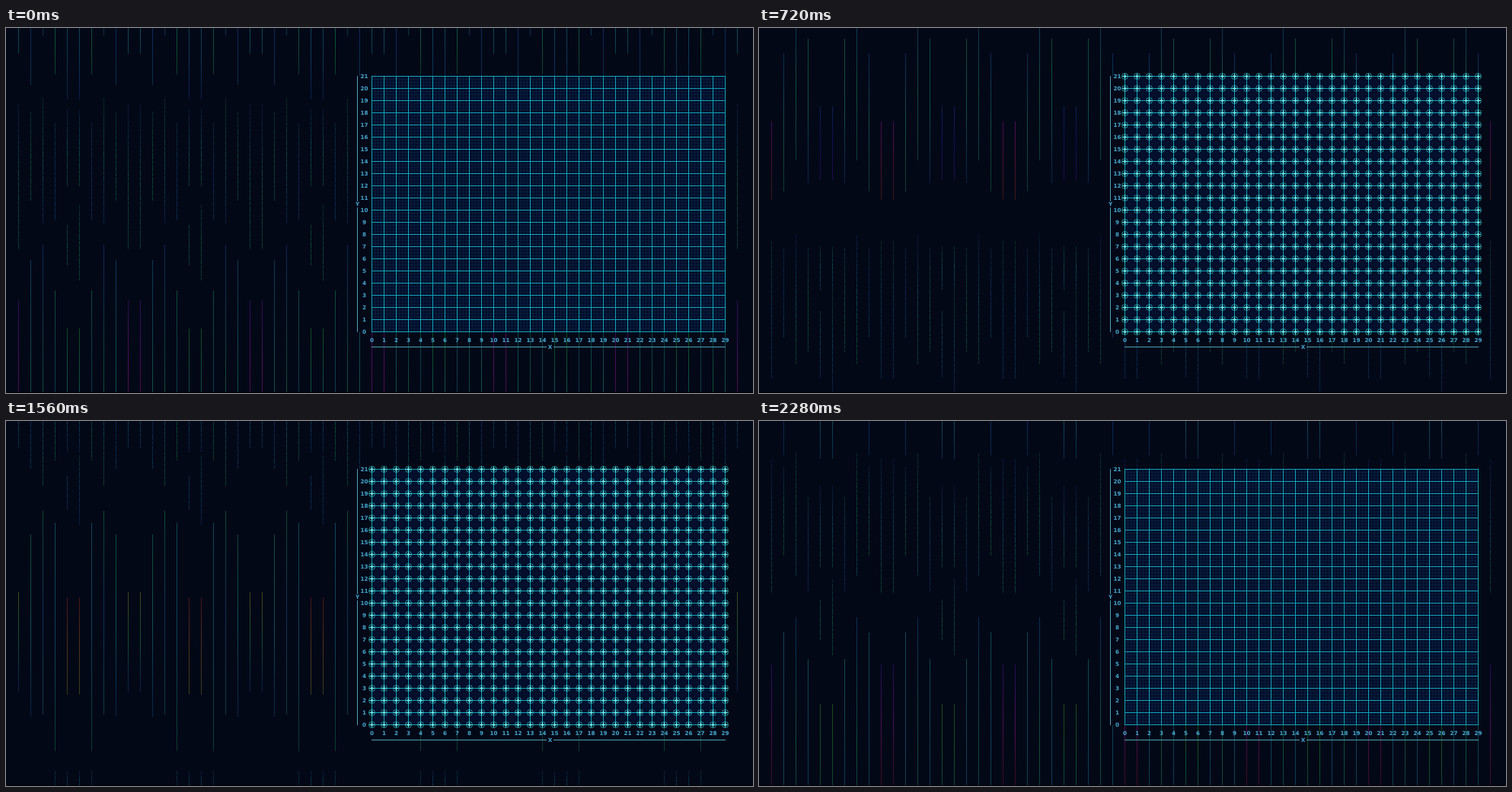
These frames come from a looping animation (981 px wide and 480 px high, 2400 ms). An HTML page:

```html
<!DOCTYPE html>
<html lang="en">
<head>
<meta charset="utf-8">
<title>Coordinate grid</title>
<style>
  html, body { margin: 0; width: 100%; height: 100%; overflow: hidden; background: #030817; }
  svg { display: block; width: 981px; height: 480px; }
  text { font: bold 7.2px "DejaVu Sans", sans-serif; fill: #46a8d0; text-anchor: middle; }
</style>
</head>
<body>
<svg id="stage" viewBox="0 0 981 480">
  <defs>
    <clipPath id="outside">
      <path clip-rule="evenodd" d="M0 0H981V479H0ZM460 63H948V400H460Z"/>
    </clipPath>
    <pattern id="fine" x="480" y="63" width="4" height="4" patternUnits="userSpaceOnUse">
      <path d="M0 .5H4M.5 0V4" stroke="#071d3c" fill="none"/>
    </pattern>
  </defs>
  <rect width="981" height="480" fill="#030817"/>
  <rect y="479" width="981" height="1" fill="#000"/>
  <g id="rain" clip-path="url(#outside)" fill="none"></g>
  <rect x="480" y="63" width="465" height="337" fill="#020d29"/>
  <rect id="mesh" x="480" y="63" width="465" height="337" fill="url(#fine)"/>
  <g id="chart" fill="none"></g>
</svg>
<script>
const LOOP = 2400, STEP = 120;
const COLS = 29, ROWS = 21, CELL = 16, LEFT = 480.5, TOP = 63.5, BOTTOM = TOP + ROWS * CELL;
const RIGHT = LEFT + COLS * CELL;
const KEYS = [0, 240, 720, 1200, 1560, 2040, 2280];

const $ = id => document.getElementById(id);
function add(parent, name, attrs, text) {
  const el = document.createElementNS("http://www.w3.org/2000/svg", name);
  for (const key in attrs) el.setAttribute(key, attrs[key]);
  if (text !== undefined) el.textContent = text;
  return parent.appendChild(el);
}

const keyTime = n => KEYS[n % 7] + LOOP * Math.floor(n / 7);
function lerpList(list, u) {
  const i = Math.min(Math.floor(u), list.length - 2);
  return list[i] + (list[i + 1] - list[i]) * (u - i);
}
const spread = (list, p) => lerpList(list, p * (list.length - 1));

// Falling streaks: columns repeat every ten; "top" is the upper end at successive key times.
const drift = [-64, 0, 50, 100, 155, 280, 405, 490];
const streaks = [
  { cols: [0, 1], born: 0, top: [-40, 28, 123, 175, 225, 293, 320, 358, 437], len: [74, 190],
    hue: [180, 190, 300, 320, 430, 600, 620, 630, 640], span: [0, 150, 30] },
  { cols: [2, 9], born: 6, top: [-50, -49, -23, 33, 104, 149, 218, 278, 305, 387], len: [95, 356] },
  { cols: [3, 8], born: 0, top: [-90, -54, -10, 58, 118, 213, 258, 285, 402], len: [100, 436] },
  { cols: [4, 7], born: 0, top: [-19, -24, 14, 80, 134, 213, 313, 345, 432], len: [80, 520] },
  { cols: [5, 6], born: 6, top: [-50, -5, 38, 103, 174, 232, 317, 372, 395, 480], len: [100, 97, 143, 150],
    hue: [170, 220, 440, 510], span: [30, 70] },
  { cols: [0, 1], born: 4, top: drift, len: [100, 190, 192, 115], dotted: true },
  { cols: [2, 9], born: 4, top: drift.map(y => y + 10), len: [117, 117], dotted: true },
  { cols: [3, 8], born: 4, top: drift.map(y => y - 8), len: [157, 175], dotted: true },
  { cols: [4, 7], born: 4, top: [-63, 43, 100, 125, 163, 289, 376, 460, 530], len: [115, 150], dotted: true },
  { cols: [5, 6], born: 3, top: [0, 45, 150, 208, 232, 254, 345, 432, 500], len: [83, 100, 100, 135, 140],
    trim: 5, dotted: true },
  { cols: [5, 6], born: 4, top: [-64, 27, 85, 107, 165, 287, 387, 460, 540], len: [105, 108, 50, 28], dotted: true }
];

// A streak can live into the third loop, so each is drawn once per loop of age.
const rays = [];
streaks.forEach((streak, n) => [0, LOOP, 2 * LOOP].forEach(lag => {
  const id = "ray" + rays.length;
  const gradient = add($("stage").querySelector("defs"), "linearGradient",
    { id, gradientUnits: "userSpaceOnUse", x1: 0, x2: 0 });
  const alphas = streak.dotted ? [.22, .42, .36] : [.46, .5, .36];
  const stops = alphas.map((alpha, i) =>
    add(gradient, "stop", { offset: i / 2, "stop-opacity": alpha }));
  const path = add($("rain"), "path", {
    stroke: `url(#${id})`,
    "stroke-dasharray": streak.dotted ? "5 1 9 1" : "none"
  });
  rays.push({ streak, n, lag, gradient, stops, path });
}));

function drawRay({ streak, n, lag, gradient, stops, path }, t) {
  const { cols, born, top, len, hue, span, trim } = streak;
  const time = t + lag, last = top.length - 1;
  const inside = time >= keyTime(born) && time <= keyTime(born + last);
  path.setAttribute("visibility", inside ? "visible" : "hidden");
  if (!inside) return;

  let i = 0;
  while (i < last - 1 && time >= keyTime(born + i + 1)) i++;
  const from = keyTime(born + i), to = keyTime(born + i + 1);
  const u = i + (time - from) / (to - from), p = u / last;
  const y = lerpList(top, u), length = spread(len, p);

  let d = "";
  for (let c = 1; c <= 60; c++) {
    if (!cols.includes(c % 10)) continue;
    const cut = c % 10 === trim;
    const a = y + (cut ? 27 : 0), b = y + length - (cut ? 20 : 0);
    if (b > a) d += `M${c * CELL + .5} ${a.toFixed(1)}V${b.toFixed(1)}`;
  }
  path.setAttribute("d", d);
  gradient.setAttribute("y1", y);
  gradient.setAttribute("y2", y + length);
  stops.forEach((stop, k) => {
    const h = hue
      ? spread(hue, p) + spread(span, p) * k / 2
      : 180 + 36 * Math.sin((y + length * k / 2) / 55 + n * 1.3);
    stop.setAttribute("stop-color", `hsl(${h % 360}, 75%, 34%)`);
  });
}

// Chart: grid lines, nodes, axes and labels.
const chart = $("chart");
let rows = "", columns = "", ringShape = "", coreShape = "", crossShape = "";
for (let r = 0; r <= ROWS; r++) rows += `M${LEFT - .5} ${TOP + r * CELL}H${RIGHT + .5}`;
for (let c = 0; c <= COLS; c++) {
  const x = LEFT + c * CELL;
  columns += `M${x} ${TOP}V${BOTTOM}`;
  for (let r = 0; r <= ROWS; r++) {
    const y = TOP + r * CELL;
    ringShape += `M${x - 4} ${y}a4 4 0 1 1 8 0a4 4 0 1 1-8 0`;
    coreShape += `M${x - 2.5} ${y}l2.5-2.5 2.5 2.5-2.5 2.5z`;
    crossShape += `M${x - 3.5} ${y}h7M${x} ${y - 3.5}v7`;
  }
}
add(chart, "path", { d: columns, stroke: "#12a2ba" });
add(chart, "path", { d: rows, stroke: "#14a2ba" });
const crosses = add(chart, "path", { d: crossShape, stroke: "#52e6e6" });
const rings = add(chart, "path", { d: ringShape, stroke: "#30d0d0" });
const cores = add(chart, "path", { d: coreShape, fill: "#3fdede" });
const sparks = add(chart, "path", { d: coreShape, fill: "#e6ffff" });

add(chart, "path", {
  d: "M461.5 63V228M461.5 236V400M480 419.5H710M719 419.5H945",
  stroke: "#4f9fb8"
});
const label = (x, y, text) => add(chart, "text", { x, y }, text);
for (let r = 0; r <= ROWS; r++) label(470.5, BOTTOM - r * CELL + 2.6, r);
for (let c = 0; c <= COLS; c++) label(LEFT + c * CELL, 413.4, c);
label(461.5, 234, "Y");
label(714.5, 422, "X");

function draw(now) {
  const t = Math.floor(now % LOOP / STEP) * STEP;
  // Dark on the first and the last step of the loop.
  const pulse = Math.sin(Math.PI * t / (LOOP - STEP)) ** 2;
  rays.forEach(ray => drawRay(ray, t));
  $("mesh").setAttribute("opacity", 1 - pulse);
  crosses.setAttribute("opacity", Math.sqrt(pulse));
  rings.setAttribute("opacity", pulse);
  cores.setAttribute("opacity", pulse);
  sparks.setAttribute("opacity", pulse ** 4);
}

const start = performance.now();
function tick() {
  draw(performance.now() - start);
  requestAnimationFrame(tick);
}
tick();
</script>
</body>
</html>
```
